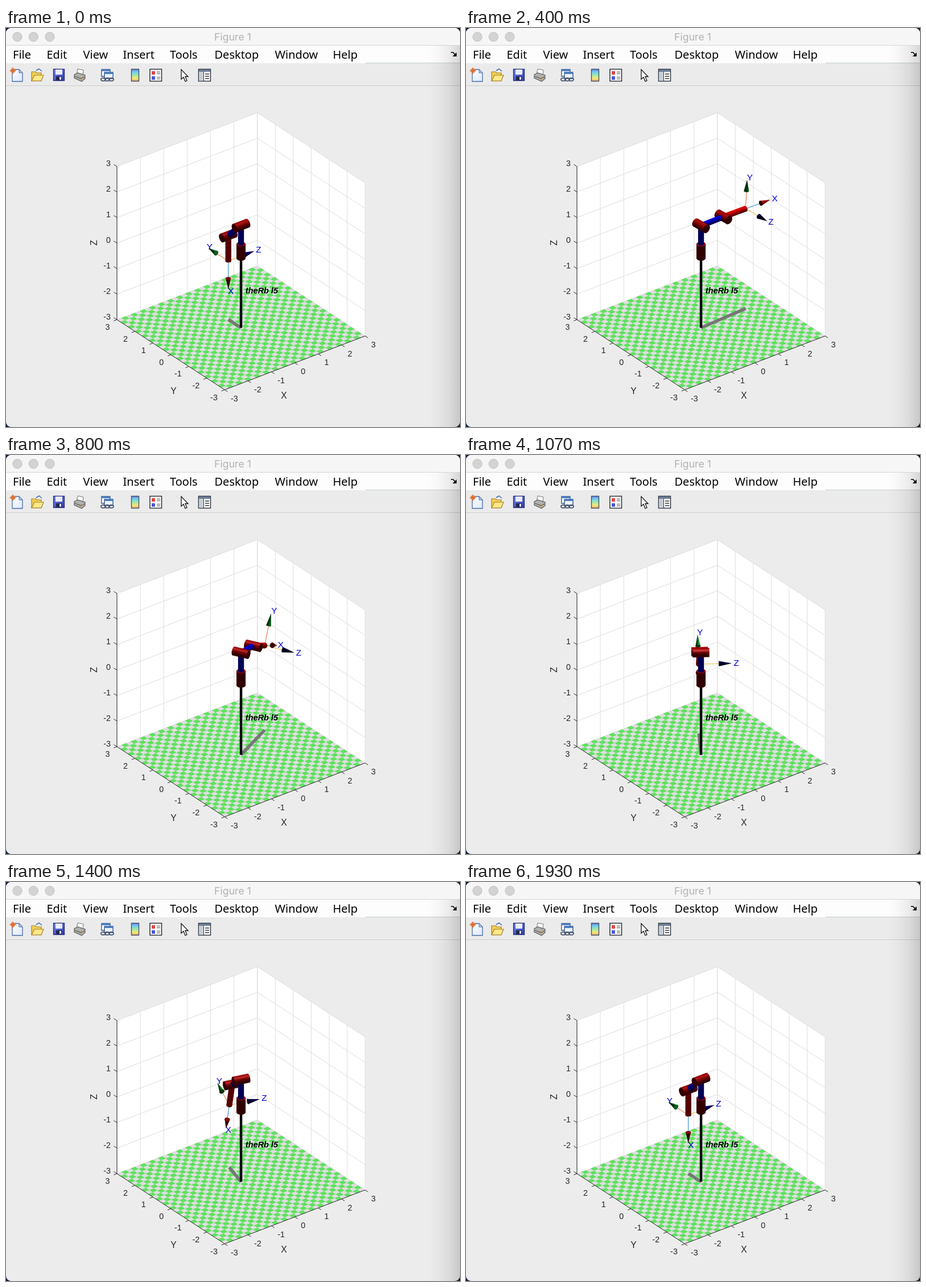
Write an HTML page with a canvas that moves like this. It is 798 px wide and 702 px high and loops after 1990 ms.

```html
<!DOCTYPE html>
<html>
<head>
<meta charset="utf-8">
<title>Figure 1</title>
<style>
html, body { margin: 0; width: 798px; height: 702px; overflow: hidden; background: #14203a; }
canvas { position: absolute; left: 0; top: 0; }
</style>
</head>
<body>
<canvas id="back" width="798" height="702"></canvas>
<canvas id="arm" width="798" height="702"></canvas>
<script>
const SANS = '"Liberation Sans", Arial, sans-serif';
const rad = Math.PI / 180, SCALE = 51.85;
const az = -37.5 * rad, el = 30 * rad;
const VIEW = [Math.sin(az) * Math.cos(el), -Math.cos(az) * Math.cos(el), Math.sin(el)];
let g = document.getElementById('back').getContext('2d');

// ---- vectors and projection ----
const dot = (a, b) => a[0] * b[0] + a[1] * b[1] + a[2] * b[2];
const along = (p, u, t) => p.map((v, i) => v + u[i] * t);
const unit = v => v.map(c => c / (Math.hypot(...v) || 1));
const cross = (a, b) => [a[1] * b[2] - a[2] * b[1], a[2] * b[0] - a[0] * b[2], a[0] * b[1] - a[1] * b[0]];
const project = ([x, y, z]) => [
  413.1 + SCALE * (x * Math.cos(az) + y * Math.sin(az)),
  392.8 - SCALE * (Math.sin(el) * (y * Math.cos(az) - x * Math.sin(az)) + z * Math.cos(el))
];

// ---- drawing helpers ----
function shape(pts, fill, stroke, width = 1, open) {
  g.beginPath();
  pts.forEach(p => g.lineTo(p[0], p[1]));
  if (!open) g.closePath();
  if (fill) { g.fillStyle = fill; g.fill(); }
  if (stroke) { g.strokeStyle = stroke; g.lineWidth = width; g.stroke(); }
}
const line = (pts, color, width) => shape(pts, null, color, width, true);
const line3 = (pts, color, width) => line(pts.map(project), color, width);
const box = (x, y, w, h, fill, stroke, width) =>
  shape([[x, y], [x + w, y], [x + w, y + h], [x, y + h]], fill, stroke, width);
function disc(x, y, r, fill, stroke) {
  g.beginPath();
  g.arc(x, y, r, 0, 7);
  g.fillStyle = fill; g.fill();
  if (stroke) { g.strokeStyle = stroke; g.lineWidth = 1; g.stroke(); }
}
function text(s, x, y, font, color, align = 'left', baseline = 'middle') {
  g.font = font; g.fillStyle = color; g.textAlign = align; g.textBaseline = baseline;
  g.fillText(s, x, y);
}
function blend(x0, y0, x1, y1, ...colors) {
  const grad = g.createLinearGradient(x0, y0, x1, y1);
  colors.forEach((c, i) => grad.addColorStop(i / (colors.length - 1), c));
  return grad;
}

// ---- window ----
function drawWindow() {
  g.beginPath();
  g.roundRect(0, 0, 798, 702, 9);
  g.clip();
  box(0, 0, 798, 702, '#ececec');
  box(0, 0, 798, 31, '#f6f6f6');
  [20, 48.3, 77].forEach(x => disc(x, 15.5, 8.2, '#d3d3d3', '#c3c3c3'));
  text('Figure 1', 398.5, 16.5, '17.7px Inter, sans-serif', '#b2b2b2', 'center');
  box(0, 31, 798, 31, '#fdfdfd');
  line([[0, 30.5], [798, 30.5]], '#d6d6d6');
  box(0, 62, 798, 40, '#ebebeb');
  line([[632, 61.5], [798, 61.5]], '#c4d0c8');
  line([[0, 101.5], [798, 101.5]], '#cdcdcd');
  const menu = { File: 12, Edit: 71.5, View: 135.5, Insert: 205.5, Tools: 288, Desktop: 366.5, Window: 472.5, Help: 574.5 };
  for (const name in menu)
    text(name, menu[name], 54, '500 20px "Noto Sans", "Open Sans", sans-serif', '#000', 'left', 'alphabetic');
  line([[782, 43], [786, 43], [790, 48]], '#000', 1.6);
  shape([[792, 43], [792, 50], [785, 50]], '#000');
  box(740, 31, 58, 671, blend(740, 0, 798, 0, '#0000', '#00000006', '#00000012', '#00000028'));
}

function drawToolbar() {
  // new page
  shape([[11, 73], [23, 73], [29, 79], [29, 94], [11, 94]], blend(11, 73, 29, 94, '#fff', '#dce8fa'), '#4a6da8', 1.3);
  shape([[23, 73], [23, 79], [29, 79]], '#b9cdec', '#4a6da8');
  disc(12, 75, 4, '#e8823c');
  line([[6, 75], [18, 75]], '#d8602a', 1.2);
  line([[12, 69.5], [12, 81]], '#d8602a', 1.2);
  // folder
  shape([[45, 93], [45, 77], [52, 77], [54, 79], [62, 79], [62, 93]], '#f3cf54', '#a4812a', 1.2);
  shape([[45, 93], [50, 83], [66, 83], [62, 93]], '#ffe888', '#a4812a', 1.2);
  line([[53, 75], [58, 72], [63, 76]], '#446fb0', 1.5);
  // disk
  box(83.5, 72.5, 19, 20, blend(83, 72, 103, 93, '#7084e8', '#3038a8'), '#262c80', 1.3);
  box(87, 73, 12, 9, '#e8eefc');
  box(88, 85, 10, 7, '#22284a');
  box(94, 86, 3, 5, '#dfe4ee');
  // printer
  shape([[124, 82], [126, 72], [136, 74], [135, 83]], '#fafafa', '#777');
  shape([[120, 82], [126, 79], [139, 83], [139, 89], [133, 94], [120, 88]], '#b0b0ac', '#5d5d5d', 1.2);
  line([[121, 85], [132, 89], [138, 86]], '#555', 1.2);
  disc(135, 89, 1.2, '#e0b040');
  // linked windows
  box(168, 73, 15, 12, '#fff', '#33568f', 1.4);
  box(168, 72.5, 15, 3.5, '#4c7cc0');
  box(173, 78, 15, 11, '#eef3fb', '#33568f', 1.4);
  box(173, 77.5, 15, 3.5, '#4c7cc0');
  g.lineWidth = 1.8; g.strokeStyle = '#4a5670';
  [171, 178, 185].forEach(x => { g.beginPath(); g.ellipse(x, 90.5, 4.2, 2.7, 0, 0, 7); g.stroke(); });
  // colorbar
  box(220.5, 72.5, 13, 21, blend(0, 72, 0, 94, '#6a7ce0', '#70cff0', '#a0e8a8', '#f4e87a', '#f0a060'), '#44506c', 1.4);
  // legend
  box(253, 72.5, 20.5, 21, '#fff', '#30343e', 1.6);
  box(256, 76, 6, 6, '#e04848');
  box(256, 85, 6, 6, '#4c58d8');
  [77.5, 80.5, 86.5, 89.5].forEach(y => line([[265, y], [271, y]], '#444'));
  // pointer
  shape([[308, 73], [308, 90], [312, 86.5], [315, 94], [318, 92.7], [315, 85.5], [320, 85.5]], '#fff', '#111', 1.3);
  // panels
  box(338.5, 72.5, 21, 21, '#fff', '#333a44', 1.5);
  box(339, 73, 20, 4, '#6d7c94');
  box(339, 77, 8, 16, '#c8ced6');
  line([[347.5, 77], [347.5, 93]], '#333a44');
  [81, 85, 89].forEach(y => line([[350, y], [357, y]], '#333', 1.7));
}

function drawAxes() {
  const num = '14.4px ' + SANS, dark = '#262626', grid = '#dedede';
  const face = (pts, fill) => shape(pts.map(project), fill);
  face([[-3, 3, -3], [3, 3, -3], [3, 3, 3], [-3, 3, 3]], '#fff');
  face([[3, 3, -3], [3, -3, -3], [3, -3, 3], [3, 3, 3]], '#fff');
  for (let v = -3; v <= 3; v++) {
    line3([[v, 3, -3], [v, 3, 3]], grid);
    line3([[3, v, -3], [3, v, 3]], grid);
    line3([[-3, 3, v], [3, 3, v], [3, -3, v]], grid);
  }
  face([[-3, -3, -3], [3, -3, -3], [3, 3, -3], [-3, 3, -3]], '#dedede');
  const tiles = 31, size = 6 / tiles;
  for (let i = 0; i < tiles; i++) for (let j = 1 - i % 2; j < tiles; j += 2) {
    const x = -3 + i * size, y = -3 + j * size;
    face([[x, y, -3], [x + size, y, -3], [x + size, y + size, -3], [x, y + size, -3]], '#60e160');
  }
  line3([[-3, 3, 3], [-3, 3, -3], [-3, -3, -3], [3, -3, -3]], dark);
  for (let v = -3; v <= 3; v++) {
    const [ax, ay] = project([v, -3, -3]), [bx, by] = project([-3, v, -3]), [cx, cy] = project([-3, 3, v]);
    line([[ax, ay], [ax + 5, ay + 3.3]], dark);
    line([[bx, by], [bx - 5.6, by + 2.2]], dark);
    line([[cx, cy], [cx - 5.5, cy - 3.6]], dark);
    text(v, ax + 10.5, ay + 16, num, dark);
    text(v, bx - 12.5, by + 14, num, dark, 'right');
    text(v, cx - 11, cy - 4.5, num, dark, 'right');
  }
  const big = '15.8px ' + SANS;
  text('X', 488.5, 647.5, big, dark, 'center');
  text('Y', 294.5, 640, big, dark, 'center');
  g.save();
  g.translate(156, 378);
  g.rotate(-Math.PI / 2);
  text('Z', 0, 0, big, dark, 'center');
  g.restore();
}

// ---- robot ----
const JOINT = { color: [255, 0, 0], ambient: 0.19, diffuse: 0.42, shine: 0.24, light: [0, 0, 1] };
const LINK = { ...JOINT, ambient: 0.33, diffuse: 0.56, shine: 0.03 };
const BLUE = { ...LINK, color: [0, 0, 255], diffuse: 0.5 };
const cone = color => ({ color, ambient: 0.2, diffuse: 0.6, shine: 0.04, light: unit([0.7, -0.3, 0.6]) });
const CONES = [cone([235, 20, 15]), cone([40, 245, 80]), cone([0, 0, 130])];

function tint(mat, n) {
  const half = unit(along(mat.light, VIEW, 1));
  const lit = mat.ambient + mat.diffuse * Math.max(0, dot(n, mat.light));
  const spec = 255 * mat.shine * Math.max(0, dot(n, half)) ** 20;
  return `rgb(${mat.color.map(c => Math.min(255, Math.round(c * lit + spec)))})`;
}

// Round solid from a to b: a cylinder, or a cone when rb is 0.
function solid(a, b, ra, rb, mat) {
  const u = unit(along(b, a, -1)), facing = dot(u, VIEW);
  const side = unit(cross(u, VIEW)), front = unit(along(VIEW, u, -facing));
  const A = project(a), B = project(b), tip = project(along(a, side, 1));
  const s = [tip[0] - A[0], tip[1] - A[1]];
  const shift = (p, r) => [p[0] + s[0] * r, p[1] + s[1] * r];
  const grad = g.createLinearGradient(...shift(A, -ra), ...shift(A, ra));
  for (let i = 0; i <= 12; i++) {
    const x = i / 6 - 1, n = along(side.map(c => c * x), front, Math.sqrt(1 - x * x));
    grad.addColorStop(i / 12, tint(mat, n));
  }
  const cap = (p, r, fill) => {
    g.beginPath();
    g.ellipse(p[0], p[1], r * SCALE, r * SCALE * Math.abs(facing), Math.atan2(s[1], s[0]), 0, 7);
    g.fillStyle = fill;
    g.fill();
  };
  cap(A, ra, grad);
  cap(B, rb, grad);
  shape([shift(A, -ra), shift(A, ra), shift(B, rb), shift(B, -rb)], grad);
  const n = facing > 0 ? u : u.map(c => -c);
  if (facing < 0) cap(A, ra, tint(mat, n));
  else if (rb) cap(B, rb, tint(mat, n));
}

function drawTriad(p, axes) {
  const wires = ['#0072bd', '#d95319', '#edb120'];
  axes.forEach((u, i) => line3([p, along(p, u, 1)], wires[i], 0.9));
  axes.map((u, i) => [u, i]).sort((a, b) => dot(a[0], VIEW) - dot(b[0], VIEW)).forEach(([u, i]) => {
    solid(along(p, u, 0.68), along(p, u, 1.12), 0.088, 0, CONES[i]);
    const [x, y] = project(along(p, u, 1.19));
    text('XYZ'[i], x - 0.5, y, '15.4px ' + SANS, '#0000d0');
  });
}

function drawRobot(s) {
  const q1 = 90 * rad * s, q2 = -45 * rad * s, c = Math.cos(q1), d = Math.sin(q1);
  const reach = q => [c * Math.cos(q), d * Math.cos(q), Math.sin(q)];
  const u2 = reach(q2), u3 = reach(2 * q2), axis = [d, -c, 0];
  const shoulder = [0, 0, 1], elbow = along(shoulder, u2, 1), hand = along(elbow, u3, 1);
  const floor = p => [p[0], p[1], -3];

  line3([floor(shoulder), floor(elbow), floor(hand)], '#777', 5.6);
  drawTriad(hand, [u3, reach(2 * q2 + Math.PI / 2), axis]);
  const joint = (p, dir) => [along(p, dir, -0.28), along(p, dir, 0.28), 0.155, JOINT];
  const column = [[0, 0, 0.28], shoulder, 0.1, BLUE];
  const depth = ([a, b]) => dot(along(a, b, 1), VIEW);
  const parts = [
    joint(shoulder, axis),
    joint(elbow, axis),
    [along(shoulder, u2, 0.12), along(elbow, u2, -0.13), 0.1, BLUE],
    [along(elbow, u3, 0.12), hand, 0.1, LINK],
    column
  ].sort((a, b) => depth(a) - depth(b));
  for (const part of parts) {
    if (part === column) {
      line3([[0, 0, -3], [0, 0, 0]], '#000', 4.4);
      const [a, b, r, mat] = joint([0, 0, 0], [0, 0, 1]);
      solid(a, b, r, r, mat);
    }
    const [a, b, r, mat] = part;
    solid(a, b, r, r, mat);
  }
  text('theRb l5', 421, 463.5, 'italic bold 14.45px ' + SANS, '#000');
}

// ---- motion: quintic joint move, paced by a few knots [step, progress] ----
const PACE = [[1, 0], [3, 0.06], [9, 0.28], [12, 0.39], [16, 0.562], [21, 0.693], [29, 1]];
function pose(step) {
  if (step < 1) return 1;
  const i = Math.max(1, PACE.findIndex(k => k[0] >= step));
  const [k0, p0] = PACE[i - 1], [k1, p1] = PACE[i];
  const t = p0 + (p1 - p0) * (step - k0) / (k1 - k0);
  return t ** 3 * (10 - 15 * t + 6 * t * t);
}

drawWindow();
drawToolbar();
drawAxes();
g = document.getElementById('arm').getContext('2d');
const start = performance.now();
function frame() {
  const ms = (performance.now() - start) % 1990;
  g.clearRect(0, 0, 798, 702);
  drawRobot(pose(Math.min(29, Math.floor((ms + 3.4) * 3 / 200))));
  requestAnimationFrame(frame);
}
frame();
</script>
</body>
</html>
```
